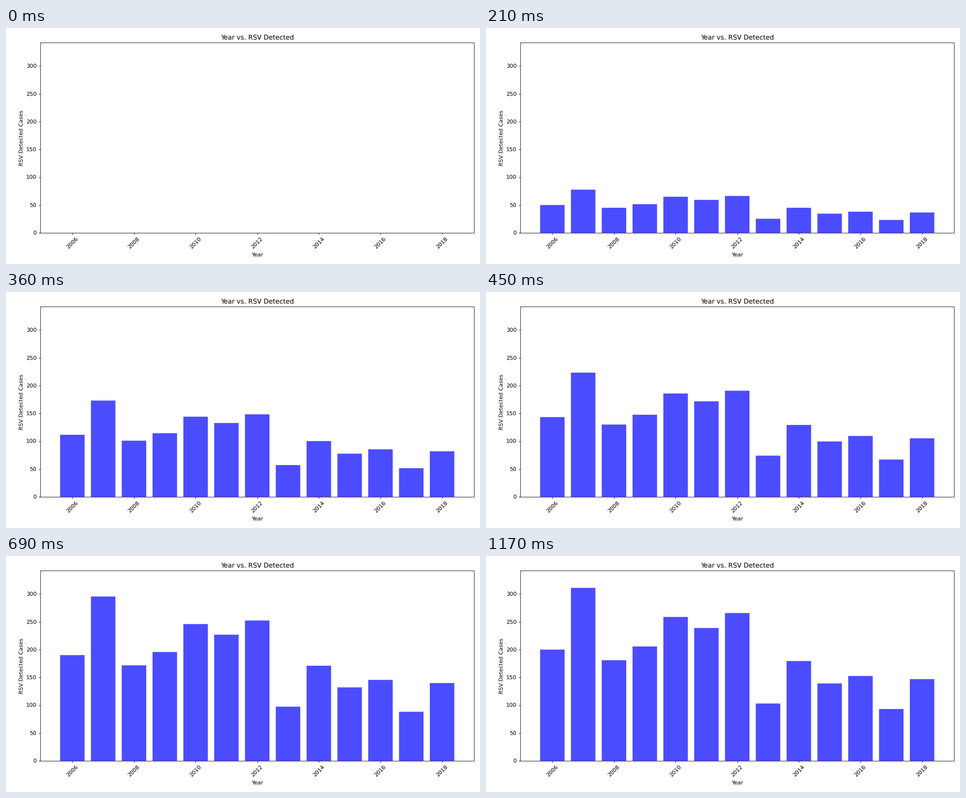
Recreate the animation shown at these times as a matplotlib script. Size 1058x529 px, loop 3.18 s.

```python
import numpy as np
import matplotlib.pyplot as plt
from matplotlib.animation import FuncAnimation
from matplotlib.patches import Rectangle

W, H = 1058, 529
DPI = W / 12
FRAMES, INTERVAL = 106, 30

# Layout grid: 1200 x 600 units, measured from the top left corner
GRID_W, GRID_H = 1200, 600
LEFT, RIGHT, TOP, BOTTOM = 87, 1185, 37.49, 520.85
X_MIN, X_MAX = 2004.96, 2019.04

years = np.arange(2006, 2019)
cases = np.array([200, 311, 181, 206, 259, 239, 266,
                  103, 180, 139, 153, 93, 147])
y_max = cases.max() * 1.1

# Each step closes step/100 of the gap that is left
steps = np.minimum(np.arange(FRAMES), 100)
growth = 1 - np.cumprod(1 - steps / 100)


def snap(v):
    return np.floor(v + 0.5)


def grid_x(year):
    return LEFT + (year - X_MIN) * (RIGHT - LEFT) / (X_MAX - X_MIN)


def grid_y(value):
    return BOTTOM - value * (BOTTOM - TOP) / y_max


plt.rcParams.update({"font.family": "DejaVu Sans", "text.hinting": "none"})
fig = plt.figure(figsize=(12, 6), dpi=DPI, facecolor="white")

# Bars and frame, placed on the layout grid
canvas = fig.add_axes([0, 0, 1, 1])
starts, ends = snap(grid_x(years - 0.4)), snap(grid_x(years + 0.4))
base = snap(BOTTOM)
bars = canvas.bar(starts, np.zeros(len(years)), ends - starts, bottom=base,
                  align="edge", color="blue", alpha=0.7, snap=False)
x0, y0 = snap(LEFT) + 0.5, snap(TOP) + 0.5
x1, y1 = snap(RIGHT) + 0.5, base + 0.5
canvas.add_patch(Rectangle((x0, y0), x1 - x0, y1 - y0, fill=False,
                           edgecolor="black", linewidth=0.8, snap=False,
                           zorder=3))
canvas.set_xlim(0, GRID_W)
canvas.set_ylim(GRID_H, 0)
canvas.axis("off")

# Ticks and labels
ax = fig.add_axes([LEFT / GRID_W, 1 - BOTTOM / GRID_H,
                   (RIGHT - LEFT) / GRID_W, (BOTTOM - TOP) / GRID_H],
                  facecolor="none")
ax.spines[:].set_visible(False)
ax.set_xlim(X_MIN, X_MAX)
ax.set_ylim(0, y_max)
ax.set_xticks(years[::2])
ax.set_yticks(range(0, 301, 50))
ax.tick_params(axis="x", rotation=45)
ax.set_title("Year vs. RSV Detected")
ax.set_xlabel("Year")
ax.set_ylabel("RSV Detected Cases")


def update(frame):
    tops = snap(grid_y(cases * growth[frame]))
    for bar, top in zip(bars, tops):
        bar.set_height(top - base)
    return list(bars)


anim = FuncAnimation(fig, update, frames=FRAMES, interval=INTERVAL,
                     repeat=True, repeat_delay=0, blit=False)
plt.show()
```
